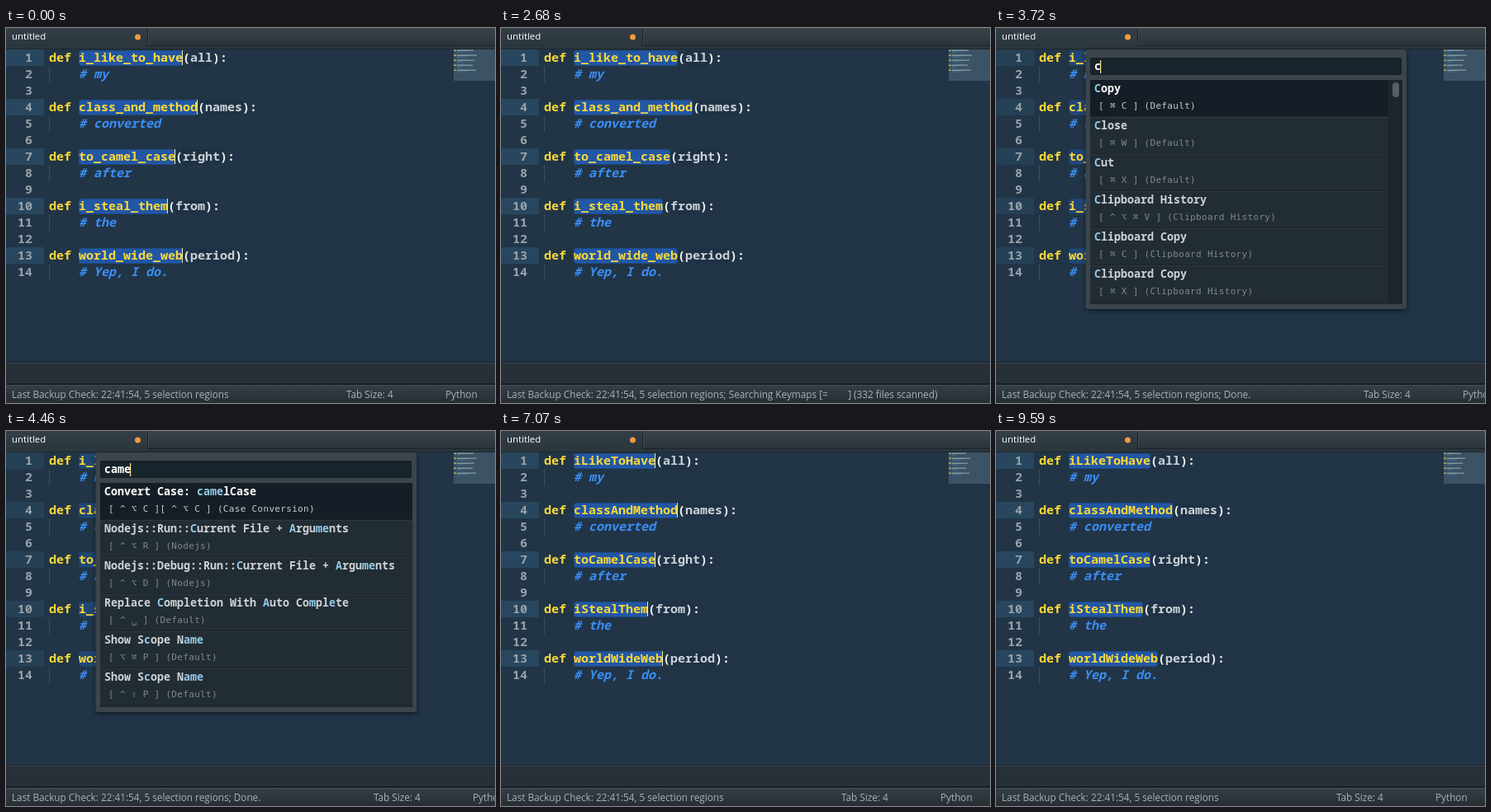
Animation of 592 by 455 pixels, one loop 9.75 s. Source, as an HTML page:

```html
<!DOCTYPE html>
<html lang="en">
<head>
<meta charset="utf-8">
<title>Camel case conversion</title>
<style>
html, body { margin: 0; width: 100%; height: 100%; overflow: hidden; background: #213547; }
svg { display: block; }
text { white-space: pre; }
.code { font: 600 15px "Noto Sans Mono", "DejaVu Sans Mono", monospace; }
.title { font: 600 13.33px "Noto Sans Mono", "DejaVu Sans Mono", monospace; }
.keys { font: 11px "DejaVu Sans Mono", monospace; letter-spacing: .32px; }
.ui { font: 500 11.75px "Open Sans", "Noto Sans", sans-serif; fill: #a9b2b7; }
.head { font: 500 11.4px "Open Sans", "Noto Sans", sans-serif; fill: #fff; }
.name { fill: #fbd938; }
.arg { fill: #ccd2d6; }
.note { fill: #3c8ef5; font-style: italic; }
.num { fill: #98a2a9; text-anchor: end; }
.hit { fill: #92cbe9; font-weight: 700; }
</style>
</head>
<body>
<svg id="stage" width="592" height="455" viewBox="0 0 592 455">
  <defs>
    <linearGradient id="bar" x2="0" y2="1"><stop stop-color="#3a444b"/><stop offset="1" stop-color="#2b343b"/></linearGradient>
    <linearGradient id="tab" x2="0" y2="1"><stop stop-color="#343e46"/><stop offset="1" stop-color="#2c363d"/></linearGradient>
    <linearGradient id="foot" x2="0" y2="1"><stop stop-color="#353f46"/><stop offset="1" stop-color="#262e34"/></linearGradient>
    <filter id="shade" x="-10%" y="-10%" width="120%" height="125%"><feDropShadow dx="0" dy="2" stdDeviation="3" flood-opacity=".55"/></filter>
  </defs>
</svg>
<script>
const LOOP = 9750, OPEN = 2830, CLOSE = 6070;
// runs of picture changes: first time, last time, count
const RUNS = [[0, 0, 1], [300, 1340, 8], [1490, 1490, 1], [1790, 2830, 8], [2980, 3870, 7],
  [4160, 4600, 4], [5050, 6070, 8], [6370, 7070, 6], [7370, 8120, 6], [8410, 9440, 8], [9590, 9590, 1]];
const STEPS = RUNS.flatMap(([from, to, n]) => Array.from({ length: n }, (_, i) =>
  Math.round((from + (n > 1 ? (to - from) * i / (n - 1) : 0)) / 10) * 10));

const DEFS = [
  ['i_like_to_have', 'all', 'my'],
  ['class_and_method', 'names', 'converted'],
  ['to_camel_case', 'right', 'after'],
  ['i_steal_them', 'from', 'the'],
  ['world_wide_web', 'period', 'Yep, I do.']
];

// asterisks enclose the letters that the query matches
const SHORT = [
  ['*C*opy', '[ ⌘ C ] (Default)'],
  ['*C*lose', '[ ⌘ W ] (Default)'],
  ['*C*ut', '[ ⌘ X ] (Default)'],
  ['*C*lipbo*a*rd History', '[ ^ ⌥ ⌘ V ] (Clipboard History)'],
  ['*C*lipbo*a*rd Copy', '[ ⌘ C ] (Clipboard History)'],
  ['*C*lipbo*a*rd Copy', '[ ⌘ X ] (Clipboard History)']
];
const LONG = [
  ['Convert Case: *camel*Case', '[ ^ ⌥ C ][ ^ ⌥ C ] (Case Conversion)'],
  ['Nodejs::Run::*C*urrent File + *A*rgu*me*nts', '[ ^ ⌥ R ] (Nodejs)'],
  ['Nodejs::Debug::Run::*C*urrent File + *A*rgu*me*nts', '[ ^ ⌥ D ] (Nodejs)'],
  ['Replace *C*ompletion With *A*uto Co*m*pl*e*te', '[ ^ ␣ ] (Default)'],
  ['Show S*c*ope N*ame*', '[ ⌥ ⌘ P ] (Default)'],
  ['Show S*c*ope N*ame*', '[ ^ ⇧ P ] (Default)']
];
const MIXED = [LONG[0], ...SHORT.slice(3), ...LONG.slice(4)];
const TYPING = [[OPEN, '', SHORT], [3700, 'c', SHORT], [3850, 'ca', MIXED],
  [4150, 'cam', LONG], [4400, 'came', LONG], [4600, 'camel', LONG.slice(0, 1)]];

const CHECK = 'Last Backup Check: 22:41:54, 5 selection regions';
// time, message, x of the tab size, x of the syntax name
const STATUS = [[0, '', 412, 532],
  [2650, '; Searching Keymaps [=' + ' '.repeat(8) + '] (332 files scanned)', 600, 600],
  [OPEN, '; Done.', 445, 565], [6650, '', 412, 532]];

const stage = document.getElementById('stage');
const lastAt = (table, t) => table.filter(row => row[0] <= t).pop();

function add(parent, tag, attrs = {}, text) {
  const el = document.createElementNS('http://www.w3.org/2000/svg', tag);
  for (const key in attrs) el.setAttribute(key, attrs[key]);
  if (text !== undefined) el.textContent = text;
  parent.append(el);
  return el;
}
const group = (parent = stage) => add(parent, 'g');
const rect = (parent, x, y, width, height, fill, rx = 0) =>
  add(parent, 'rect', { x, y, width, height, fill, rx });
const label = (parent, x, y, cls, text, fill) =>
  add(parent, 'text', fill ? { x, y, class: cls, fill } : { x, y, class: cls }, text);
const show = (el, on) => el.setAttribute('visibility', on ? 'visible' : 'hidden');

function buildFrame() {
  rect(stage, 0, 0, 592, 455, '#213547');
  rect(stage, 0, 0, 592, 21, 'url(#bar)');
  rect(stage, 0, 21, 592, 1, '#1c2429');
  rect(stage, 0, 22, 592, 3, '#2c363d');
  rect(stage, 0, 25, 592, 1, '#1c2831');
  rect(stage, 0, 0, 171, 22, 'url(#tab)');
  rect(stage, 171, 0, 1, 22, '#1d242a');
  rect(stage, 172, 0, 1, 21, '#3f4951');
  label(stage, 7, 14, 'head', 'untitled');
  add(stage, 'circle', { cx: 159.5, cy: 11, r: 3.5, fill: '#f2993f' });
  rect(stage, 0, 405, 592, 1, '#182027');
  rect(stage, 0, 406, 592, 1, '#414b52');
  rect(stage, 0, 407, 592, 25, '#273037');
  rect(stage, 0, 431, 592, 2, '#171e23');
  rect(stage, 0, 433, 592, 22, 'url(#foot)');
  rect(stage, 0, 433, 592, 1, '#444e55');
  rect(stage, 542, 26, 50, 38, '#3c5366');
}

function buildCode(defs) {
  const root = group(), picks = [], carets = group();
  defs.forEach(([name, arg, note], i) => {
    const y = 26 + 60 * i, end = 88 + 9 * name.length, mapY = 26.5 + 6 * i;
    const pick = rect(root, 88.5, y + 1.5, end - 89, 18, '#2257a5', 2.5);
    pick.setAttribute('stroke', '#214a84');
    picks.push(pick);
    rect(root, end + 9, y + 1, 9 * arg.length, 19, '#1f3245');
    label(root, 52, y + 15, 'code name', 'def ' + name);
    const call = label(root, end, y + 15, 'code', '(', '#f2f4f5');
    add(call, 'tspan', { class: 'arg' }, arg);
    add(call, 'tspan', {}, '):');
    label(root, 88, y + 35, 'code note', '# ' + note);
    rect(carets, end - 1, y + 1, 1, 18, '#f6eaa6');

    rect(root, 542, mapY, 3, 1.5, '#b5ab4f');
    rect(root, 546, mapY, name.length, 1.5, '#4f86c4');
    rect(root, 546, mapY + .3, name.length, .7, '#b0ad6a');
    rect(root, 546 + name.length, mapY, arg.length + 3, 1.3, '#8797a3');
    rect(root, 546, mapY + 2, note.length + 2, 1, '#406f9f');
  });
  root.append(carets);
  return { root, picks, carets };
}

function buildGutter() {
  const bands = DEFS.map((_, i) => rect(stage, 0, 26 + 60 * i, 46, 20, '#28475e'));
  for (let n = 1; n <= 14; n++) label(stage, 32, 21 + 20 * n, 'code num', n);
  DEFS.forEach((_, i) => add(stage, 'path', {
    d: `M52.5 ${47 + 60 * i}v20`, stroke: '#566775', 'stroke-dasharray': '1 1' }));
  return bands;
}

function marked(parent, source, limit) {
  let hit = false, count = 0, run = '', style = false;
  const flush = () => {
    if (run) add(parent, 'tspan', style ? { class: 'hit' } : {}, run);
    run = '';
  };
  for (const ch of source) {
    if (ch === '*') { hit = !hit; continue; }
    const on = hit && count++ < limit;
    if (on !== style) flush();
    style = on;
    run += ch;
  }
  flush();
}

function buildPalette([, query, rows]) {
  const root = group(), n = rows.length, listH = n > 1 ? 272 : 46;
  const scroll = rows === SHORT, width = scroll ? 361 : 378;
  rect(root, 108.5, 26, 388.5, listH + 43, '#3b454b', 3).setAttribute('filter', 'url(#shade)');
  rect(root, 114, 36, 377, 21, '#151f26', 2);
  rect(root, 115, 37, 375, 19, '#18242c', 1);
  label(root, 119, 51, 'title', query, '#fff');
  rect(root, 114, 63, 378, listH, '#222b32');
  rows.forEach(([name, keys], i) => {
    const y = 63 + 45 * i, top = i === 0;
    rect(root, 114, y, width, 45, top ? '#151e26' : '#222c33');
    if (!top) rect(root, 114, y, width, 1, '#2d383f');
    if (n > 1) rect(root, 114, y + 44, width, 1, '#1a2329');
    marked(label(root, 119, y + 15, 'title', '', top ? '#fff' : '#cdd3d6'), name, query.length);
    label(root, 124, y + 35, 'keys', keys, top ? '#c4cace' : '#7f898f');
  });
  if (scroll) {
    rect(root, 475, 63, 17, 272, '#1c252b');
    rect(root, 480, 66, 8, 18, '#566067', 4);
  }
  const caret = rect(root, 118 + 8 * query.length, 39, 1.2, 16, '#ffe48a');
  return { root, caret };
}

buildFrame();
const bands = buildGutter();
const snake = buildCode(DEFS);
const camel = buildCode(DEFS.map(([name, ...rest]) =>
  [name.replace(/_(.)/g, (_, ch) => ch.toUpperCase()), ...rest]));
const palettes = TYPING.map(buildPalette);
const message = label(stage, 7, 449, 'ui', '');
const tabSize = label(stage, 412, 449, 'ui', 'Tab Size: 4');
const syntax = label(stage, 532, 449, 'ui', 'Python');

function blink(t) {
  const wave = .5 + 1.1 * Math.cos((t - 75) / 1050 * 2 * Math.PI);
  return Math.max(0, Math.min(1, wave));
}

function draw(time) {
  const t = STEPS.filter(s => s <= time).pop();
  const open = t >= OPEN && t < CLOSE, done = t >= CLOSE;
  show(snake.root, !done);
  show(camel.root, done);
  const code = done ? camel : snake;
  code.carets.setAttribute('opacity', open ? 0 : blink(done ? t - 6020 : t));
  code.picks.forEach(p => {
    p.setAttribute('fill', open ? '#214775' : '#2257a5');
    p.setAttribute('stroke', open ? '#214066' : '#214a84');
  });
  bands.forEach(b => b.setAttribute('fill', open ? '#264055' : '#28475e'));

  const current = open ? TYPING.indexOf(lastAt(TYPING, t)) : -1;
  palettes.forEach((p, i) => show(p.root, i === current));
  if (open) {
    const alpha = t < 3700 ? blink(t - 2680) : t < 4902 ? 1 : blink(t - 4752);
    palettes[current].caret.setAttribute('opacity', alpha);
  }

  const [, note, sizeX, syntaxX] = lastAt(STATUS, t);
  message.textContent = CHECK + note;
  tabSize.setAttribute('x', sizeX);
  syntax.setAttribute('x', syntaxX);
}

const start = performance.now();
function tick() {
  draw((performance.now() - start) % LOOP);
  requestAnimationFrame(tick);
}
tick();
</script>
</body>
</html>
```
